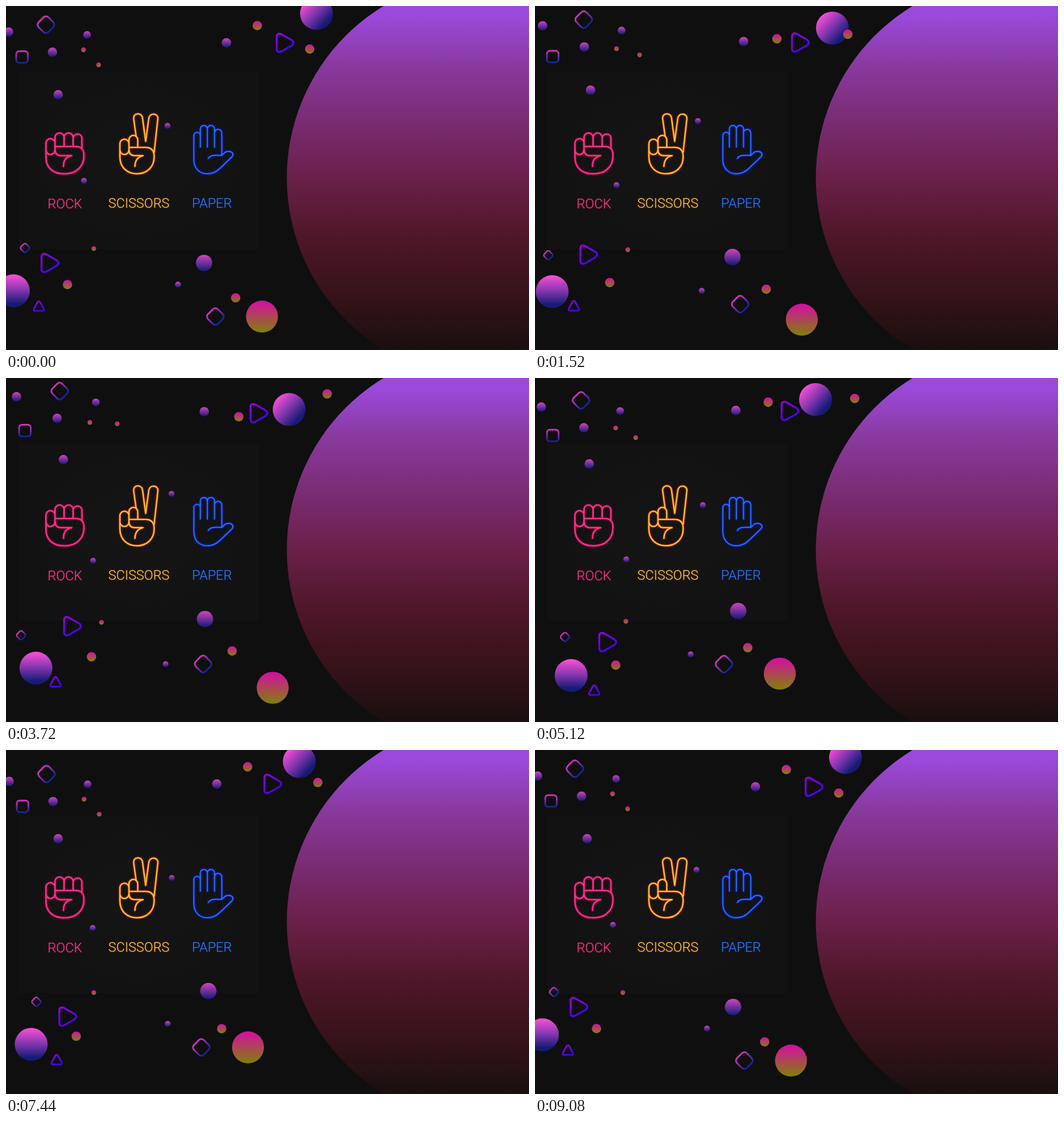
Write an HTML page that moves like this. It is 923 px wide and 607 px high and loops after 9.18 s.

```html
<!DOCTYPE html>
<html lang="en">
<head>
<meta charset="utf-8">
<title>Rock Scissors Paper</title>
<style>
  html, body { margin: 0; width: 100%; height: 100%; overflow: hidden; background: #0f0f10; }
  svg { display: block; width: 100%; height: 100%; }
  .hand path { fill: none; stroke-linecap: round; stroke-linejoin: round; }
  .hand .rim { stroke: var(--rim); stroke-width: 3.2; }
  .hand .core { stroke: var(--core); stroke-width: 1.4; }
  .hand text { font: 300 23.5px Roboto, sans-serif; text-anchor: middle; fill: var(--core); }
  .hand { filter: drop-shadow(0 0 1.5px var(--glow)); }
</style>
</head>
<body>
<svg viewBox="0 0 923 607" preserveAspectRatio="none">
  <defs>
    <linearGradient id="disc" gradientUnits="userSpaceOnUse" x2="0" y2="607">
      <stop offset=".03" stop-color="#9b49da"/>
      <stop offset=".17" stop-color="#893a9f"/>
      <stop offset=".33" stop-color="#7a2c74"/>
      <stop offset=".5" stop-color="#6a2049"/>
      <stop offset=".66" stop-color="#50172a"/>
      <stop offset=".83" stop-color="#37131a"/>
      <stop offset="1" stop-color="#1a0f0e"/>
    </linearGradient>
    <linearGradient id="violet" x2="0" y2="1">
      <stop offset="0" stop-color="#ff4fd8"/><stop offset=".5" stop-color="#7d35ac"/>
      <stop offset=".9" stop-color="#161b74"/>
    </linearGradient>
    <linearGradient id="slant" href="#violet" x1=".1" y1=".15" x2=".85" y2=".85"/>
    <linearGradient id="plum" x2="0" y2="1">
      <stop offset="0" stop-color="#d046bc"/><stop offset="1" stop-color="#141a78"/>
    </linearGradient>
    <linearGradient id="olive" x2="0" y2="1">
      <stop offset="0" stop-color="#d80ca4"/><stop offset="1" stop-color="#808008"/>
    </linearGradient>
    <linearGradient id="frame" x2="0" y2="1">
      <stop offset="0" stop-color="#d034b8"/><stop offset="1" stop-color="#142494"/>
    </linearGradient>
    <linearGradient id="arrow" x2=".6" y2="1">
      <stop offset="0" stop-color="#9800e0"/><stop offset="1" stop-color="#3a08e0"/>
    </linearGradient>
    <radialGradient id="panel">
      <stop offset="0" stop-color="#151516"/><stop offset="1" stop-color="#121213"/>
    </radialGradient>
  </defs>

  <rect width="923" height="607" fill="#0f0f10"/>
  <rect x="22" y="116" width="424" height="313" fill="url(#panel)"/>
  <circle cx="850" cy="303.2" r="354.4" fill="url(#disc)"/>

  <g class="hand" style="--rim:#e4146c;--core:#ff3a90;--glow:#ff146a70" data-d="
    M70.5 242a8 8 0 0 1 16 0V254a8 8 0 0 1-16 0Z
    M70.5 250V267C70.5 285 83 296 101 296H105C124 296 137.5 283 137.5 265V262C137.5 253 132 248 124 248H86.5
    M86.5 240V232a8 8 0 0 1 16 0V247M102.5 232a8 8 0 0 1 16 0V247M118.5 232a8 8 0 0 1 15.5 0V250
    M86.5 248V253Q86.5 264 97 264H116Q101 267 101.5 283">
    <text x="104" y="356.5">ROCK</text>
  </g>
  <g class="hand" style="--rim:#e86a10;--core:#ffd83c;--glow:#ff401480" data-d="
    M201 243a8 8 0 0 1 16 0V254a8 8 0 0 1-16 0Z
    M201 250V266C201 285 214 296 231 296C249 296 261.5 284 261.5 266C261.5 255 256 249.5 247 249.5H217
    M217 243V236a7.7 7.7 0 0 1 15.5 0V249
    M229.5 229L225.3 199C224 188 240 187 241 198L246.5 239L252 198C254 187.500 269 189 268 199L261.5 258
    M217 249V253Q217 264 227 264H242Q228 267 227.5 283">
    <text x="234.5" y="356">SCISSORS</text>
  </g>
  <g class="hand" style="--rim:#0e2ce4;--core:#2a80ff;--glow:#1438ff70" data-d="
    M343 249V228a5.8 5.8 0 0 0-11.500 0V271C331.5 286 341 296 355 296C364 296 371 293 377 287L399 266C403 261 399 257 394 256.5C387 256 385 260 381 263.5
    M343 228V217a6.2 6.2 0 0 1 12.4 0V249M355.4 217a6.2 6.2 0 0 1 12.6 0V249
    M368 224a6.4 6.4 0 0 1 12.8 0V263.5H370Q360 263.5 357 269">
    <text x="363.5" y="356">PAPER</text>
  </g>
  <g id="floaters"></g>
</svg>
<script>
const LOOP = 9180, MOVE = 9080, STEP = 40;
const layer = document.getElementById('floaters');
const floaters = [];

function make(tag, attrs, parent) {
  const el = document.createElementNS('http://www.w3.org/2000/svg', tag);
  for (const key in attrs) el.setAttribute(key, attrs[key]);
  return parent.appendChild(el);
}

document.querySelectorAll('.hand').forEach(hand => {
  for (const name of ['rim', 'core']) make('path', { class: name, d: hand.dataset.d }, hand);
});

// A floater goes from home to home + out, on to home + turn, and back home.
function drift(tag, attrs, home, out, turn) {
  const el = make('g', {}, layer);
  make(tag, attrs, el);
  floaters.push({ el, home, stops: [[0, 0], out, turn, [0, 0]] });
}

const ball = (paint, r, ...way) => drift('circle', { r, fill: `url(#${paint})` }, ...way);

const outline = (tag, paint, width, attrs, ...way) => drift(tag,
  { fill: 'none', stroke: `url(#${paint})`, 'stroke-width': width, ...attrs }, ...way);

const box = (side, tilt, ...way) => outline('rect', 'frame', side < 20 ? 2.5 : 3, {
  x: -side / 2, y: -side / 2, width: side, height: side, rx: side / 4, transform: `rotate(${tilt})`
}, ...way);

const play = (...way) => outline('path', 'arrow', 3.4, {
  d: 'M-14.8 11V-11C-14.8-16-11-17.5-6-15L11.5-5C16-2 16 2 11.5 5L-6 15C-11 17.5-14.8 16-14.8 11Z'
}, ...way);

const peak = (...way) => outline('path', 'arrow', 3, {
  d: 'M-2.5-6.5Q0-10.5 2.5-6.5L8.5 4.5Q10.5 8.7 6.5 8.7H-6.5Q-10.5 8.7-8.5 4.5Z'
}, ...way);

// Sizes and the turns that neighbours share.
const DOT = 4.2, BEAD = 5.2, PEARL = 8.3, GLOBE = 29;
const STAY = [0, 0], SINK = [1.8, 17.4], LEFT = [-31.5, -9], FALL = [58, 31.2], RISE = [-45.6, -43];

// top left
ball('plum', PEARL, [4.5, 46], [17.5, -22], SINK);
ball('plum', 6.7, [143, 51], [19.5, -15.5], SINK);
ball('plum', PEARL, [82, 81.5], [10, -18.5], SINK);
ball('olive', DOT, [136.8, 77.3], [14, -4], SINK);
ball('olive', DOT, [163.5, 103.7], [42, -35], SINK);
box(24.5, -45, [70.5, 33], [31, -18], SINK);
box(20.5, 0, [28.3, 90], [6, -1.5], SINK);

// middle
ball('plum', PEARL, [92, 156.5], [12, -16], STAY);
ball('plum', BEAD, [285, 211.5], [5, -17], [14, 26]);
ball('plum', BEAD, [137.5, 308.5], [12.5, 15], [28.5, 10]);

// top right
play([492.5, 65], [-48, -1], [-40, -9.5]);
ball('plum', PEARL, [389, 65], [-41.5, -4.5], LEFT);
ball('olive', PEARL, [443.5, 34.5], [-33, 46.5], LEFT);
ball('slant', GLOBE, [548, 13.3], [-46, 51], [-56, 13]);
ball('olive', PEARL, [536, 76], [32, -52], [26.5, -34.5]);

// bottom left
box(13, -45, [33.5, 427], [-20, 25.5], [37, 32]);
play([77.5, 453.5], [34.5, -29.5], FALL);
ball('violet', GLOBE, [13, 502.5], [34.5, 3], FALL);
peak([58, 529.3], [21, -1], FALL);
ball('olive', PEARL, [108.5, 491.5], [46.5, -7], [28.5, 25]);
ball('olive', DOT, [155, 428], [17.5, 4], STAY);

// bottom right
ball('plum', 14.4, [349.5, 453.5], [-2, -21], [14, -52]);
ball('plum', BEAD, [303.5, 491.5], [-18.5, 22], [-33.5, -15.5]);
ball('olive', PEARL, [405.3, 515], [5.5, -30.5], RISE);
box(24.5, -45, [369.5, 548], [-14.5, -43.5], RISE);
ball('olive', 28.2, [451.8, 548], [38, 11], RISE);

function draw() {
  const time = Math.floor(performance.now() % LOOP / STEP) * STEP;
  const progress = Math.min(time / MOVE, .99999) * 3;
  const leg = Math.floor(progress), part = progress - leg;
  for (const { el, home, stops } of floaters) {
    const [x, y] = home.map((v, i) => v + stops[leg][i] * (1 - part) + stops[leg + 1][i] * part);
    el.setAttribute('transform', `translate(${x} ${y})`);
  }
  requestAnimationFrame(draw);
}
draw();
</script>
</body>
</html>
```
